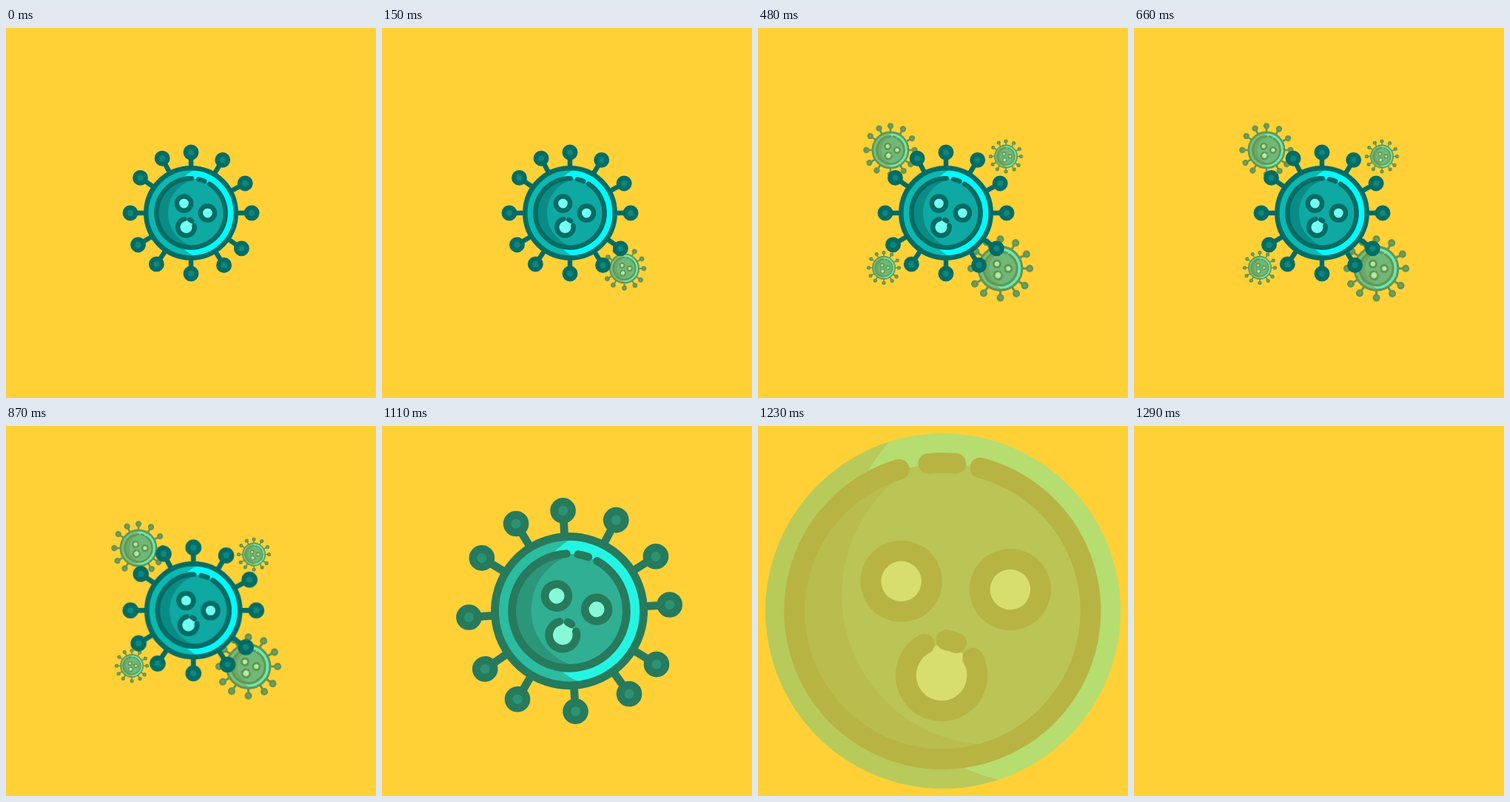
Recreate the animation shown at these times as an HTML page. Size 500 by 500 pixels, loop 1.44 s.

```html
<!DOCTYPE html>
<html lang="en">
<head>
<meta charset="utf-8">
<title>Virus</title>
<style>
  html, body { margin: 0; width: 100%; height: 100%; overflow: hidden; background: #ffd137; }
  svg { display: block; width: 100%; height: 100%; }
  .line { fill: none; stroke: #046c64; stroke-width: 6.5; stroke-linecap: round; }
</style>
</head>
<body>
<svg viewBox="0 0 500 500">
  <defs>
    <clipPath id="porthole"><circle cx="250" cy="250" r="240"/></clipPath>
    <clipPath id="body"><circle r="60.7"/></clipPath>
    <clipPath id="core"><circle r="46.3"/></clipPath>
    <g id="virus">
      <g id="spikes"></g>
      <circle r="60.7" fill="#0ab9b1"/>
      <circle cx="34.6" r="65.6" fill="#00fbff" clip-path="url(#body)"/>
      <circle r="60.7" class="line"/>
      <circle r="46.3" fill="#0a8c86"/>
      <g clip-path="url(#core)"><circle cx="16.1" r="47.1" fill="#0fa9a3"/></g>
      <g id="face"></g>
    </g>
  </defs>
  <g clip-path="url(#porthole)">
    <g id="small" opacity=".6"></g>
    <use id="main" href="#virus"/>
  </g>
</svg>
<script>
const LOOP = 1440, STEP = 30;
const $ = id => document.getElementById(id);
const clamp = v => Math.max(0, Math.min(1, v));
const progress = (t, start, end) => clamp((t - start) / (end - start));

// Angles are in degrees, clockwise from the top.
function polar(angle, r, cx = 0, cy = 0) {
  const a = angle * Math.PI / 180;
  return [cx + r * Math.sin(a), cy - r * Math.cos(a)].map(v => v.toFixed(2));
}

function arc(from, to, r, cx, cy) {
  const large = to - from > 180 ? 1 : 0;
  return `<path class="line" d="M${polar(from, r, cx, cy)}A${r} ${r} 0 ${large} 1 ${polar(to, r, cx, cy)}"/>`;
}

function eye(x, y) {
  return `<circle class="line" cx="${x}" cy="${y}" r="9.6" style="fill:#73fff3"/>`;
}

const spikeAngles = [0, 30.8, 61.3, 90, 125, 147.7, 180, 214, 239, 270, 304.8, 332.2];
$('spikes').innerHTML = spikeAngles.map(angle => {
  const [x, y] = polar(angle, angle % 90 ? 83.4 : 82);
  return `<path class="line" d="M0 0L${x} ${y}"/>
    <circle class="line" cx="${x}" cy="${y}" r="7.2" style="fill:#09897f"/>`;
}).join('');

const mouth = [11.25, -6.5, 19.2];
$('face').innerHTML =
  arc(32.6, 360.8, 46.7) + arc(12.4, 23, 46.7) +
  eye(-9.5, -12.9) + eye(22.4, 0.1) +
  `<circle cx="${mouth[1]}" cy="${mouth[2]}" r="9.5" fill="#73fff3"/>` +
  arc(79, 349, ...mouth) + arc(25.5, 42.3, ...mouth);

const smallOnes = [
  { x: 327.5, y: 325, size: .483, start: 90 },
  { x: 170, y: 324, size: .25, start: 180 },
  { x: 179, y: 165, size: .398, start: 270 },
  { x: 335, y: 173.5, size: .25, start: 360 }
];
for (const one of smallOnes) {
  one.node = document.createElementNS('http://www.w3.org/2000/svg', 'use');
  one.node.setAttribute('href', '#virus');
  $('small').append(one.node);
}

function place(node, x, y, scale, angle = 0) {
  node.setAttribute('transform', `translate(${x} ${y}) rotate(${angle}) scale(${scale})`);
}

// Rises from 0 to 1 and falls back between start and end.
const beat = (t, start, end) => 1 - Math.abs(2 * progress(t, start, end) - 1);

function draw(t) {
  for (const { node, x, y, size, start } of smallOnes) {
    place(node, x, y, size * progress(t, start, start + 90));
  }
  $('small').style.display = t < 1110 ? '' : 'none';

  const pulse = .5 * beat(t, 540, 660) + beat(t, 720, 900);
  const exit = progress(t, 1080, 1290);
  place($('main'),
    250 + 4 * progress(t, 0, 90) - 2.5 * pulse - 6.5 * exit,
    250 - 2.5 * pulse,
    1 + .11 * pulse + 4.6 * exit,
    -25 * exit);
  $('main').setAttribute('opacity', 1 - exit);
}

const begin = performance.now();
function tick() {
  const t = (performance.now() - begin) % LOOP;
  draw(Math.floor(t / STEP) * STEP);
  requestAnimationFrame(tick);
}
tick();
</script>
</body>
</html>
```
